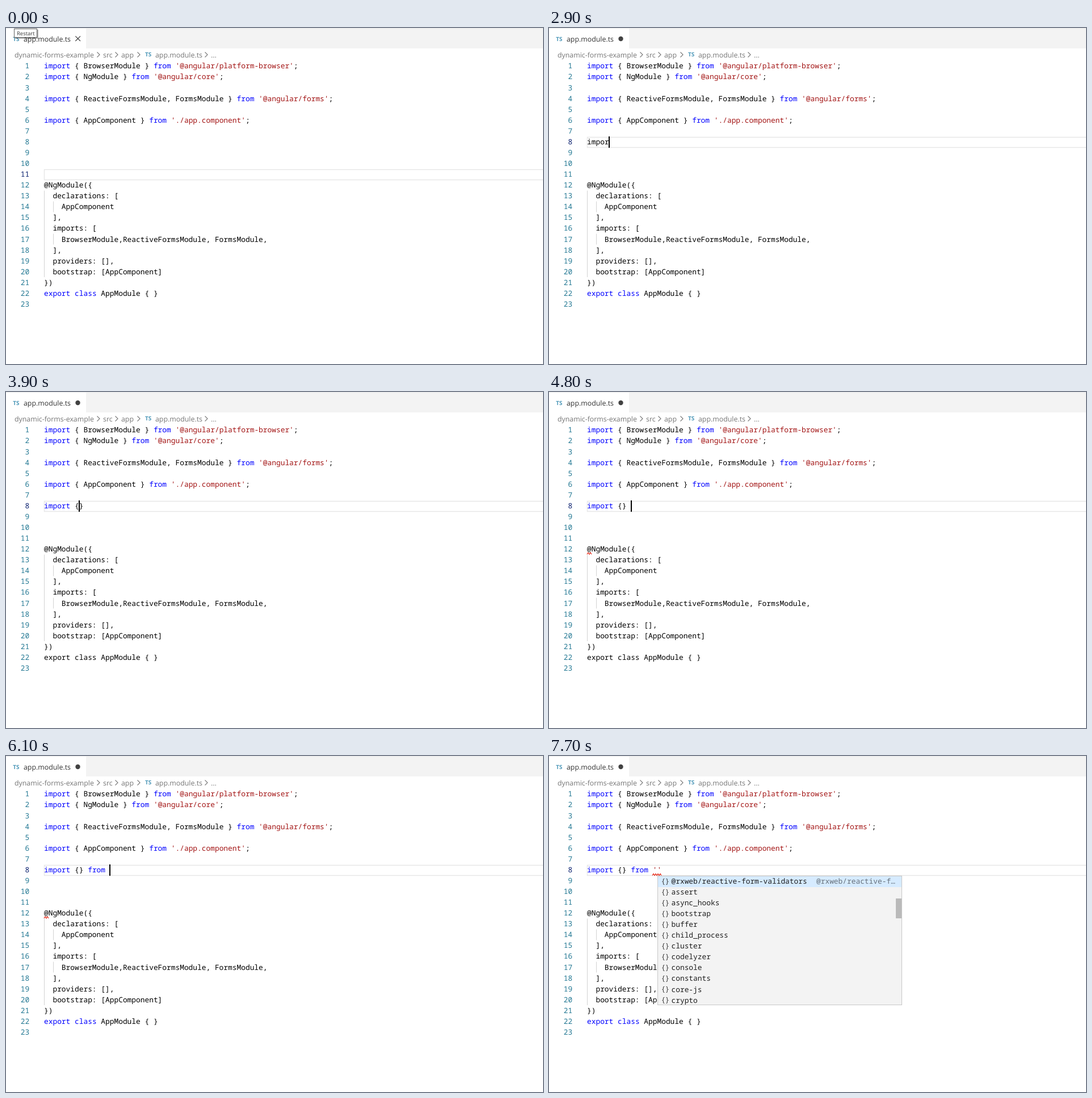
Recreate the animation shown at these times as an HTML page. Size 946x592 px, loop 8000 ms.

```html
<!DOCTYPE html>
<html lang="en">
<head>
<meta charset="utf-8">
<title>Editor typing</title>
<style>
  html, body { margin: 0; width: 100%; height: 100%; overflow: hidden; background: #fff; }
  svg { display: block; width: 946px; height: 592px; }
  text { white-space: pre; text-rendering: geometricPrecision; }
  .code { font: 12.87px "Noto Sans Mono", monospace; }
  .ui { font: 12.35px "Open Sans", sans-serif; }
  .badge { font: bold 10px "Open Sans", sans-serif; fill: #519aba; }
  .kw { fill: #00f; }
  .str { fill: #a31515; }
  .match { fill: #0066bf; font-weight: bold; }
</style>
</head>
<body>
<svg id="stage" viewBox="0 0 946 592"></svg>
<script>
const LOOP = 8000, LEFT = 67, CHAR = 7.72, ROW = 19.07, WIDTH = 430;
const stage = document.getElementById('stage');

const lines = `import { BrowserModule } from '@angular/platform-browser';
import { NgModule } from '@angular/core';

import { ReactiveFormsModule, FormsModule } from '@angular/forms';

import { AppComponent } from './app.component';





@NgModule({
  declarations: [
    AppComponent
  ],
  imports: [
    BrowserModule,ReactiveFormsModule, FormsModule,
  ],
  providers: [],
  bootstrap: [AppComponent]
})
export class AppModule { }
`.split('\n');

// time, text before the caret, text after it
const typing = [
  [0, ''], [2000, 'i'], [2500, 'im'], [2600, 'imp'], [2700, 'impo'], [2900, 'impor'],
  [3000, 'import'], [3400, 'import '], [3800, 'import {', '}'], [4200, 'import {}'],
  [4600, 'import {} '], [5300, 'import {} f'], [5400, 'import {} fr'],
  [5600, 'import {} fro'], [5900, 'import {} from'], [6100, 'import {} from '],
  [7300, "import {} from '", "'"]
];
const marks = [...typing.map(k => k[0]), 200, 1100, 1500, 4000, 4300, 4800, 6400, 6900, 7400, 7600, 7700];

const importItems = ['import statement', 'import', 'importScripts', 'ImportClause', 'ImportDeclaration',
  'ImportSpecifier', 'ImportTypeNode', 'importNode'];
const fromItems = ['from', 'fromEvent', 'fromEventPattern', 'fromStringWithSourceMap', 'formArrayNameProvider',
  'formControlBinding', 'formControlBinding', 'formDirectiveProvider', 'formDirectiveProvider',
  'formGroupNameProvider', 'format', 'format'];
const moduleItems = ['@rxweb/reactive-form-validators', 'assert', 'async_hooks', 'bootstrap', 'buffer',
  'child_process', 'cluster', 'codelyzer', 'console', 'constants', 'core-js', 'crypto'];

const text = (x, y, s, cls = 'code', attrs = '') => `<text x="${x}" y="${y}" class="${cls}" ${attrs}>${s}</text>`;
const rect = (x, y, w, h, fill, attrs = '') =>
  `<rect x="${x}" y="${y}" width="${w}" height="${h}" fill="${fill}" ${attrs}/>`;
const path = (d, color, attrs = '') => `<path d="${d}" fill="none" stroke="${color}" ${attrs}/>`;
const baseline = n => 71.4 + ROW * (n - 1);
const colX = c => Math.floor(LEFT + CHAR * c);
const within = (t, a, b) => t >= a && t < b;

function colour(s, words = 'import|from|export|class') {
  const rule = new RegExp(`('[^']*')|\\b(?:${words})\\b`, 'g');
  return s.replace(rule, (m, str) => `<tspan class="${str ? 'str' : 'kw'}">${m}</tspan>`);
}

function squiggle(x, y, w) {
  let d = `M${x} ${y + 3}`;
  for (let i = 2; i <= w; i += 2) d += `L${x + i} ${y + (i % 4 ? 0 : 3)}`;
  return path(d, '#e51400', 'stroke-width="1.1"');
}

// icons are drawn around the centre of their row
const icons = {
  cube: path('M0-6L5.5-3.2V3L0 6L-5.5 3V-3.2ZM-5.5-3.2L0-.3L5.5-3.2M0-.3V6', '#652d90', 'stroke-width="1.2"'),
  constant: path('M-6-4.5H6V4.5H-6ZM-3.5-1.5H3.5M-3.5 1.5H3.5', '#424242', 'stroke-width="1.1"'),
  snippet: path('M-6 6V-6H6V6', '#424242', 'stroke-width="1.1"') +
    path('M-6 6H6', '#424242', 'stroke-dasharray="2 1"'),
  braces: text(-7, 4.2, '{', 'code', 'fill="#424242"') + text(0, 4.2, '}', 'code', 'fill="#424242"')
};

function popup(x, items, iconOf, matched, detail = '', detailX = 0) {
  const h = Math.round(items.length * ROW - 1.5);
  let out = rect(x + .5, 211.5, WIDTH, h, '#f3f3f3', 'stroke="#c8c8c8"') +
    rect(x + 1, 212, WIDTH - 1, Math.min(19, h - 1), '#d6ebff');
  items.forEach((item, i) => {
    const y = 224.8 + ROW * i;
    const label = `<tspan class="match">${item.slice(0, matched)}</tspan>${item.slice(matched)}`;
    out += `<g transform="translate(${x + 13.5} ${y - 4.3})">${icons[iconOf(item)]}</g>` +
      text(x + 24.5, y, label, 'code', 'fill="#1e1e1e"');
  });
  return out + text(x + detailX, 224.8, detail, 'code', 'fill="#66707a"');
}

function importPopup(x, items) {
  return popup(x, items, s => s.includes(' ') ? 'snippet' : 'cube', 6, 'Import external module. (TypeS…', 162) +
    `<circle cx="${x + 412}" cy="221" r="4.8" fill="none" stroke="#66707a"/>` +
    path(`M${x + 412} 220.5V224M${x + 412} 218V219.2`, '#66707a');
}

function header(dirty, tooltip) {
  const chevron = x => path(`M${x - 2.5} 42.5L${x + 2} 47L${x - 2.5} 51.5`, '#767676', 'stroke-width="1.1"');
  const crumb = (x, s) => text(x, 52, s, 'ui', 'fill="#767676"');
  let out = rect(141, 1, 805, 35, '#f3f3f3') + rect(0, 0, 946, 1, '#ececec') +
    text(12.3, 23, 'TS', 'badge') + text(31, 24, 'app.module.ts', 'ui', 'fill="#333"') +
    (dirty ? '<circle cx="126.5" cy="19" r="4.2" fill="#424242"/>'
      : path('M122.3 14.3L131 23M131 14.3L122.3 23', '#424242', 'stroke-width="1.2"')) +
    crumb(15, 'dynamic-forms-example') + crumb(171, 'src') + crumb(203, 'app') +
    text(245, 50.3, 'TS', 'badge') + crumb(263, 'app.module.ts') + crumb(361, '...') +
    [163, 195, 234, 353].map(chevron).join('');
  if (tooltip) out += rect(16, 3, 41, 16, '#000', 'opacity=".3"') +
    rect(14.5, 1.5, 40, 15, '#fff', 'stroke="#606060"') +
    text(19, 12.7, 'Restart', 'ui', 'style="font-size:9.5px" fill="#3c3c3c"');
  return out;
}

function draw(t) {
  const [, before, after = ''] = typing.filter(k => k[0] <= t).pop();
  const active = t < 1100 ? 11 : 8;
  const top = Math.round(baseline(active) - 13) + .5;
  let out = header(t >= 2000, t < 200) +
    rect(LEFT + .5, top, 900, 18, 'none', 'stroke="#e6e6e6" stroke-width="1.4"');

  if (within(t, 4000, 4800))
    for (const c of [7, 8])
      out += rect(colX(c) + .5, 192.5, 7, 17, '#e5efe5', 'stroke="#b9b9b9"');

  out += path('M67.5 286.5V439M83.5 305.5V324.5M83.5 362.5V381.5', '#d3d3d3');
  lines.forEach((line, i) => {
    const n = i + 1, y = baseline(n);
    let code = colour(line);
    if (n == 8) code = colour(before + after, t < 3000 ? 'x' : t < 6100 ? 'import' : 'import|from');
    if (n == 22 && within(t, 3000, 6100)) code = line;
    out += text(41.3, y, n, 'code', `text-anchor="end" fill="${n == active ? '#0b216f' : '#237893'}"`) +
      text(LEFT, y, code);
  });

  if (within(t, 4300, 7600)) out += squiggle(67, 283, 8);
  if (t >= 7600) out += squiggle(182, 207.5, 16);
  if (within(t, 1100, 1500) || within(t, 2000, 6400) || within(t, 6900, 7700))
    out += rect(colX(before.length), 191, 2, 20, '#000');

  if (within(t, 3000, 3400)) out += importPopup(113, importItems);
  if (within(t, 3400, 3800)) out += importPopup(121, importItems.slice(0, 1));
  if (within(t, 5900, 6100))
    out += popup(176, fromItems, s => /^form[A-Z]/.test(s) ? 'constant' : 'cube', 4) +
      rect(596, 211.5, 10, 21, '#b4b9be');
  if (t >= 7400)
    out += popup(191, moduleItems, () => 'braces', 0, '@rxweb/reactive-f…', 280) +
      rect(611, 251, 10, 35, '#bababa');
  stage.innerHTML = out;
}

let shown = -1;
function tick(now) {
  const t = now % LOOP;
  const step = Math.max(...marks.filter(m => m <= t));
  if (step != shown) draw(shown = step);
  requestAnimationFrame(tick);
}
tick(performance.now());
</script>
</body>
</html>
```
